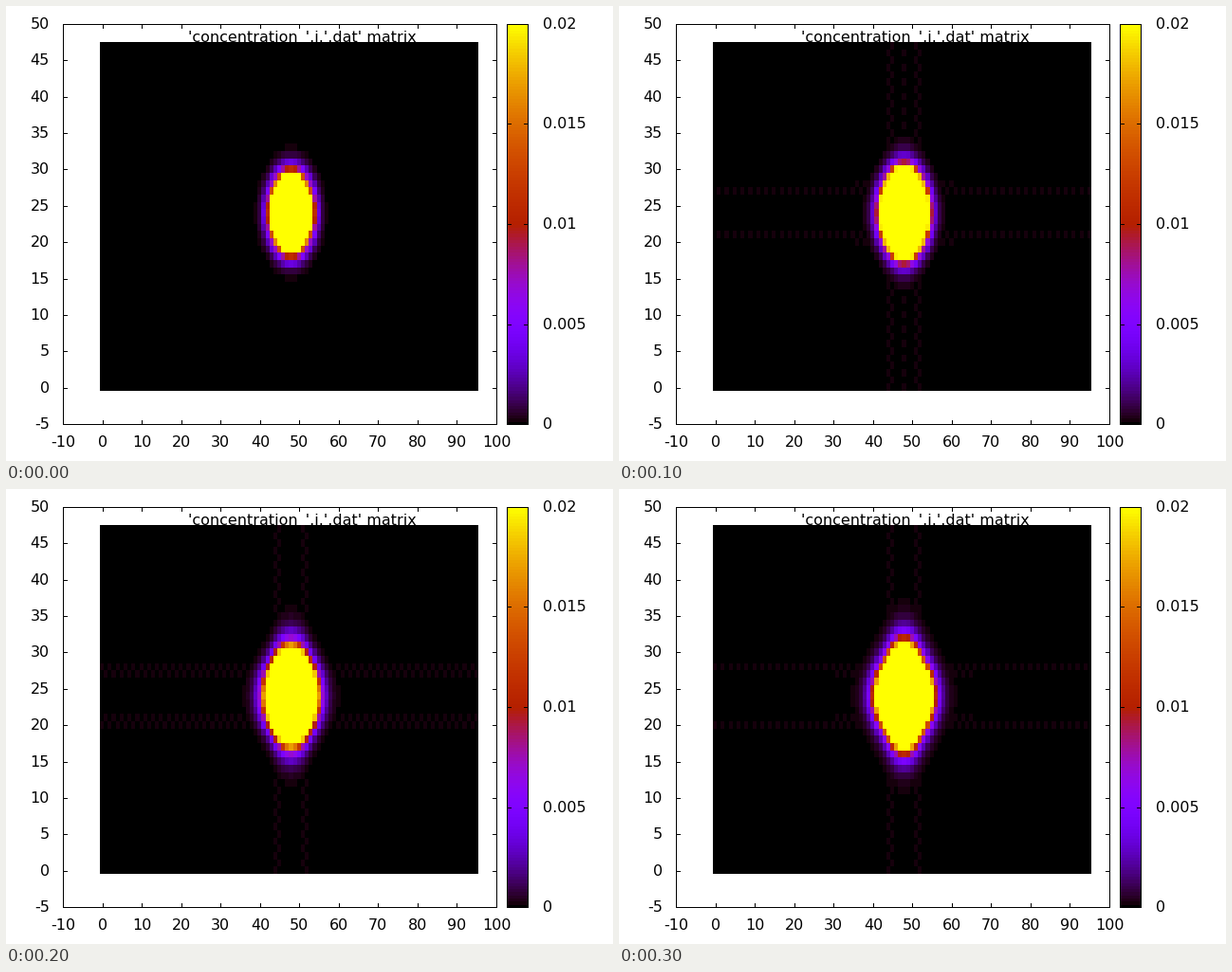
A matplotlib script that plays this animation: 640x480 px, repeating every 400 ms.

```python
import numpy as np
import matplotlib.pyplot as plt
from matplotlib.animation import FuncAnimation
from matplotlib.colors import ListedColormap

W, H, DPI = 640, 480, 100
LEFT, RIGHT, TOP, BOTTOM = 60, 517, 19, 441
BAR_L, BAR_R = 528, 550
PX = 72 / DPI
FONT = dict(family="DejaVu Sans", fontsize=16 * PX, color="black",
            va="baseline")
LEVELS = 128
STEPS = 4

COL, ROW = np.meshgrid(np.arange(96), np.arange(48))
DX, DY = abs(COL - 48), abs(ROW - 24)


def palette():
    t = np.linspace(0, 1, LEVELS)
    blue = np.clip(np.sin(2 * np.pi * t), 0, 1)
    return ListedColormap(np.column_stack([np.sqrt(t), t**3, blue]))


def decay(d, core):
    """Gaussian fall-off inside the core, exponential tail outside."""
    return 0.09 * np.where(d < core, d**2, core * (2 * d - core))


def ripples(step):
    """Faint alternating cells running out from the blob along both axes."""
    if step == 0:
        return np.zeros(COL.shape, bool)
    side, far = DX > 8, DY > 9
    inner = side & (DY == 3) & (COL % 2 == 1)
    outer = side & (DY == 4) & (COL % 2 == 0)
    # The wave moves from the inner rows to the outer ones
    inner &= (step < 3) | (DX < 18)
    outer &= (step > 1) | (DX < 13)
    cols = far & (DX == 4 - ROW % 2)
    middle = far & (DX == 0) & (ROW % 2 == 0) & (step == 1)
    return inner | outer | cols | middle


def field(step):
    peak = 2.66 + 1.42 * (step / (STEPS - 1)) ** 0.4
    core = 4.35 + 5 * np.exp(-1.05 * step)
    t = np.exp(peak - decay(DX, core) - decay(DY, core))
    level = np.clip(np.floor(t * LEVELS), 0, LEVELS - 1)
    return np.maximum(level, ripples(step))


def line(x, y):
    ax.plot(np.array(x) + .5, np.array(y) + .5, color="black", lw=PX,
            snap=False, solid_capstyle="projecting",
            solid_joinstyle="miter", zorder=5)


def frame_box(x0, x1):
    line([x0, x1, x1, x0, x0], [TOP, TOP, BOTTOM, BOTTOM, TOP])


def y_tick(x0, x1, y, size=4):
    line([x0, x0 + size], [y, y])
    line([x1 - size, x1], [y, y])


fig = plt.figure(figsize=(W / DPI, H / DPI), dpi=DPI, facecolor="white")
ax = fig.add_axes([0, 0, 1, 1])
style = dict(cmap=palette(), vmin=0, vmax=LEVELS - 1, interpolation="nearest",
             origin="lower", aspect="auto", zorder=3)

heat = ax.imshow(field(0), extent=(99, 498, 406, 38), **style)
ax.imshow(np.arange(LEVELS)[:, None],
          extent=(BAR_L, BAR_R + 1, BOTTOM + 1, TOP), **style)
ax.set(xlim=(0, W), ylim=(H, 0))
ax.axis("off")

# The black map hides the descenders of this line
ax.text(433, 38, "'concentration_'.j.'.dat' matrix", ha="right", zorder=2,
        **FONT)

frame_box(LEFT, RIGHT)
frame_box(BAR_L, BAR_R)

for v in range(-10, 101, 10):
    x = round(LEFT + (v + 10) * (RIGHT - LEFT) / 110)
    line([x, x], [BOTTOM - 4, BOTTOM])
    line([x, x], [TOP, TOP + 4])
    ax.text(x, 465, str(v), ha="center", **FONT)

for v in range(-5, 51, 5):
    y = round(BOTTOM - (v + 5) * (BOTTOM - TOP) / 55)
    y_tick(LEFT, RIGHT, y)
    ax.text(46, y + 5, str(v), ha="right", **FONT)

for i in range(5):
    y = round(BOTTOM - i * (BOTTOM - TOP) / 4)
    y_tick(BAR_L, BAR_R, y)
    ax.text(566, y + 5, f"{i * 0.005:g}", ha="left", **FONT)


def update(i):
    heat.set_data(field(i))
    return [heat]


anim = FuncAnimation(fig, update, frames=STEPS, interval=100,
                     repeat=True, repeat_delay=0, blit=False)
plt.show()
```
